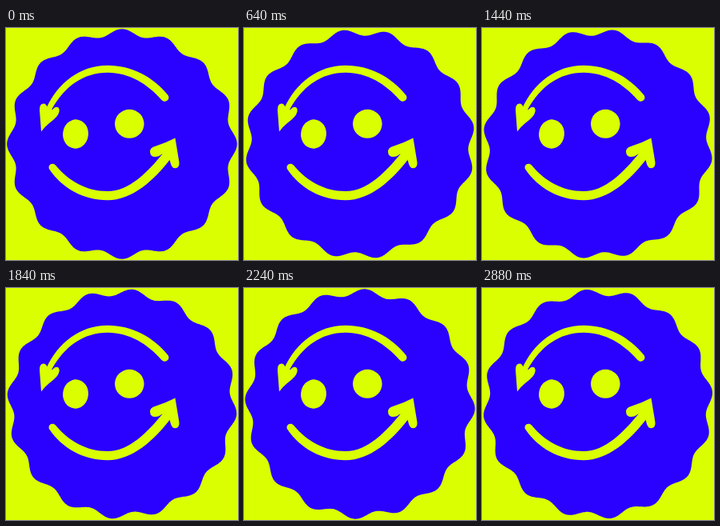
An HTML page with a canvas for the animation above (2960 ms loop, 290 by 290 pixels).

```html
<!DOCTYPE html>
<html lang="en">
<head>
<meta charset="utf-8">
<title>Smiling badge</title>
<style>
  html, body { margin: 0; width: 100%; height: 100%; overflow: hidden; background: #d9ff00; }
  canvas { display: block; width: 290px; height: 290px; }
</style>
</head>
<body>
<canvas id="stage" width="290" height="290"></canvas>
<script>
const ctx = document.getElementById('stage').getContext('2d');
const LIME = '#d9ff00';
const BLUE = '#2a00ff';
const LOOP = 2960;
const STEP = 80;
const TURN = -9.55 * Math.PI / 180; // badge rotation per step
const CENTER = 145;
const LOBES = 16;

// Two tapered arcs, each followed by its arrowhead.
const arrows = [
  'M202.5 84C184 61 157 46.8 127 46.8C93 46.8 65 68 50 101L51 111L57 102C73 73 97 55.8 127 55.8C154 55.8 177 70 194.5 90C199 94.5 206 89.5 202.5 84Z',
  'M44 129.5L42 103Q41.5 95 46.5 94.5Q51 94.5 51.5 100L58 102Q62 97 65.5 99.5Q68.5 103 64 110Q60 114.5 54 119Q49 123 44 129.5Z',
  'M54.5 177C70 200 97 215.3 127 215.3C157 215.3 185 191 206 163L196 157C177 180 154 204 127 204C100 204 78 191 62 171.5C58 167 51 171.5 54.5 177Z',
  'M211.5 137.5L216.5 168Q217 175 211.5 175.3Q207.5 175.3 206 170L204 163L195 157.5Q191 161 186.5 161Q180.5 161 180 155Q180 149.5 186 148Q199 144 211.5 137.5Z'
].map(d => new Path2D(d));

function drawBadge(angle) {
  ctx.fillStyle = BLUE;
  ctx.beginPath();
  for (let i = 0; i < 720; i++) {
    const a = i * Math.PI / 360;
    const r = 139.6 + 4.2 * Math.cos(LOBES * a);
    ctx.lineTo(CENTER + r * Math.sin(a + angle), CENTER - r * Math.cos(a + angle));
  }
  ctx.fill();
}

function drawEye(x, y, rx, ry, tilt) {
  ctx.beginPath();
  ctx.ellipse(x, y, rx, ry, tilt, 0, Math.PI * 2);
  ctx.fill();
}

function drawFace() {
  ctx.fillStyle = LIME;
  arrows.forEach(path => ctx.fill(path));
  drawEye(87, 132.5, 15.9, 18.2, 0.1);
  drawEye(154.3, 119.8, 18.3, 18, 0);
}

function frame(now) {
  const step = Math.floor((now % LOOP) / STEP);
  ctx.fillStyle = LIME;
  ctx.fillRect(0, 0, 290, 290);
  drawBadge(step * TURN);
  drawFace();
  requestAnimationFrame(t => frame(Math.max(0, t - start)));
}

const start = performance.now();
frame(0);
</script>
</body>
</html>
```
